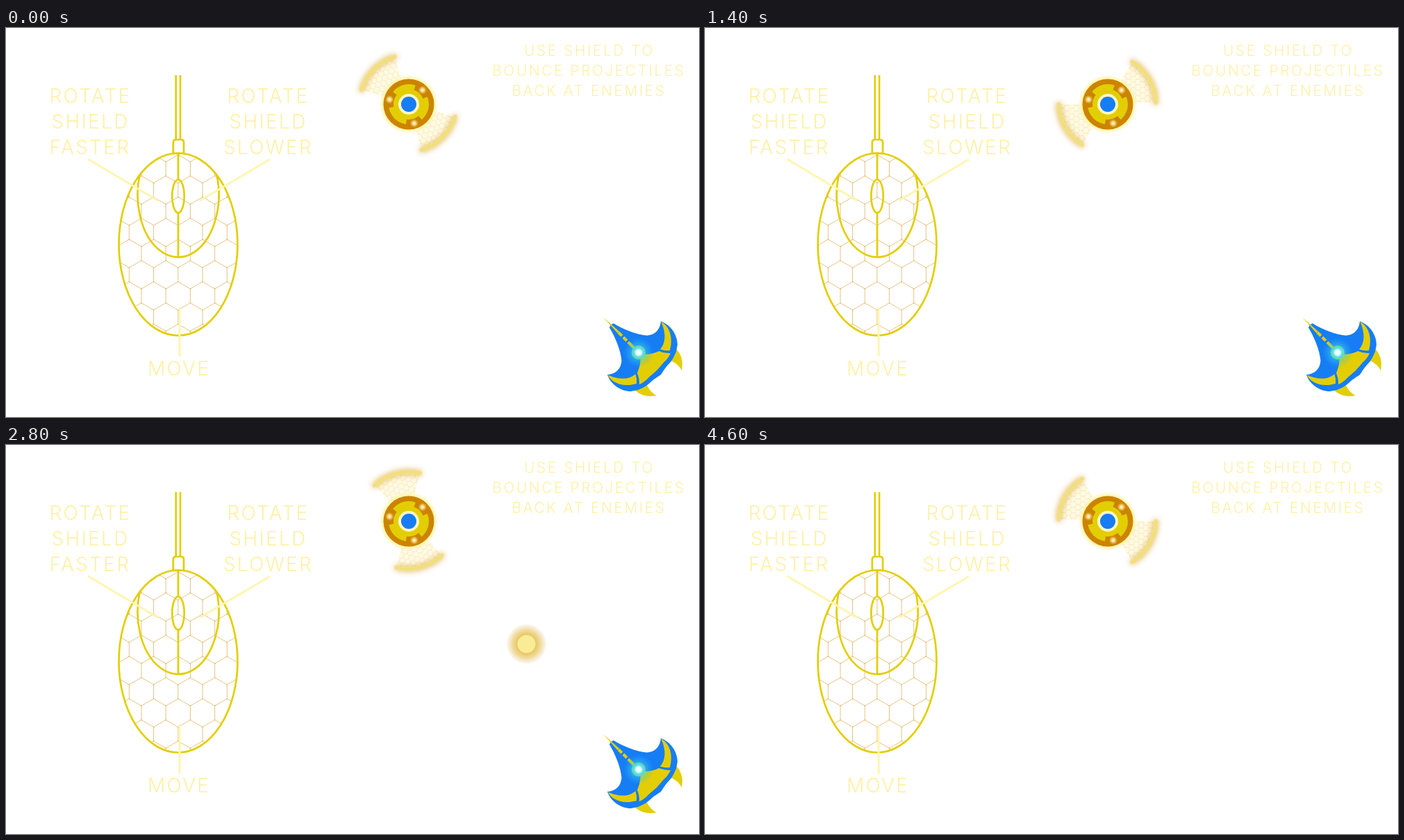
An HTML page with a canvas that plays this animation: 998 by 561 pixels, repeating every 4.8 s.

```html
<!DOCTYPE html>
<html lang="en">
<head>
<meta charset="utf-8">
<title>Shield controls</title>
<style>
  html, body { margin: 0; width: 100%; height: 100%; overflow: hidden; background: #fff; }
  canvas, svg { position: absolute; left: 0; top: 0; width: 998px; height: 561px; }
  text { font: 300 28px Inter, "Open Sans", sans-serif; letter-spacing: 2.3px; fill: #fff0a4; text-anchor: middle; }
  .tip text { font-size: 21px; letter-spacing: 2.5px; }
</style>
</head>
<body>
<canvas id="stage" width="998" height="561"></canvas>
<svg viewBox="0 0 998 561">
  <text x="121.5" y="107.5">ROTATE</text>
  <text x="121.5" y="144.5">SHIELD</text>
  <text x="121" y="182">FASTER</text>
  <text x="377.5" y="107.5">ROTATE</text>
  <text x="377.5" y="144.5">SHIELD</text>
  <text x="377.5" y="182">SLOWER</text>
  <text x="249" y="500.5">MOVE</text>
  <g class="tip">
    <text x="840" y="39.5">USE SHIELD TO</text>
    <text x="839.5" y="68.5">BOUNCE PROJECTILES</text>
    <text x="839.5" y="97.5">BACK AT ENEMIES</text>
  </g>
</svg>
<script>
const ctx = document.getElementById("stage").getContext("2d");
const LOOP = 4800, STEP = 200, TAU = Math.PI * 2;
const GOLD = "#e3ce05", AMBER = "#cc8400", BLUE = "#167df4", PALE = "#fff5b0";
const CX = 580, CY = 110;
const PIVOT = [579.2, 108.7], REACH = 70;
const rad = deg => deg * Math.PI / 180;

function disc(x, y, r, fill) {
  ctx.fillStyle = fill;
  ctx.beginPath();
  ctx.arc(x, y, r, 0, TAU);
  ctx.fill();
}

function glow(x, y, r, stops) {
  const g = ctx.createRadialGradient(x, y, 0, x, y, r);
  stops.forEach(([at, color]) => g.addColorStop(at, color));
  disc(x, y, r, g);
}

function line(x1, y1, x2, y2) {
  ctx.beginPath();
  ctx.moveTo(x1, y1);
  ctx.lineTo(x2, y2);
  ctx.stroke();
}

function oval(x, y, rx, ry) {
  ctx.beginPath();
  ctx.ellipse(x, y, rx, ry, 0, 0, TAU);
}

// Pointy-top honeycomb; (x0, y0) is the top of one upright edge.
function honeycomb(x0, y0, side, box, dot) {
  const half = side * Math.sqrt(3) / 2, row = side * 1.5;
  const [left, top, right, bottom] = box;
  const first = Math.floor((top - y0) / row) - 1;
  const last = Math.ceil((bottom - y0) / row);
  const dots = new Path2D();
  ctx.beginPath();
  for (let k = first; k <= last; k++) {
    const y = y0 + k * row;
    const from = Math.floor((left - x0) / (2 * half)) - 1;
    for (let x = x0 + from * 2 * half + (k & 1) * half; x < right + 2 * half; x += 2 * half) {
      ctx.moveTo(x, y);
      ctx.lineTo(x, y + side);
      ctx.lineTo(x - half, y + row);
      ctx.moveTo(x, y + side);
      ctx.lineTo(x + half, y + row);
      if (dot) {
        dots.rect(x - dot, y - dot, 2 * dot, 2 * dot);
        dots.rect(x - dot, y + side - dot, 2 * dot, 2 * dot);
      }
    }
  }
  ctx.stroke();
  if (dot) ctx.fill(dots);
}

function drawMouse() {
  ctx.save();
  oval(248, 312, 85.5, 131.5);
  ctx.clip();
  ctx.strokeStyle = ctx.fillStyle = "#e5bd75";
  ctx.lineWidth = 0.9;
  honeycomb(230.2, 193, 20.35, [160, 180, 336, 445], 0.8);
  ctx.restore();

  ctx.strokeStyle = GOLD;
  ctx.lineWidth = 2.7;
  oval(248, 312, 85.5, 131.5);
  ctx.stroke();
  const rise = Math.asin(29 / 90);
  ctx.beginPath();
  ctx.ellipse(248, 240.5, 58.5, 90, 0, -rise, Math.PI + rise);
  ctx.stroke();
  oval(248, 242.5, 8.7, 24);
  ctx.stroke();
  line(248, 181, 248, 218.5);
  line(248, 266.5, 248, 330);
  line(244.7, 68, 244.7, 161);
  line(251, 68, 251, 161);
  ctx.beginPath();
  ctx.moveTo(240.8, 181);
  ctx.lineTo(240.8, 165);
  ctx.quadraticCurveTo(240.8, 161, 244.8, 161);
  ctx.lineTo(252, 161);
  ctx.quadraticCurveTo(256, 161, 256, 165);
  ctx.lineTo(256, 181);
  ctx.closePath();
  ctx.stroke();

  ctx.strokeStyle = PALE;
  ctx.lineWidth = 3;
  line(118, 189, 219, 249);
  line(380, 189.5, 279, 249);
  line(250, 403, 250, 474);
}

function drawWing() {
  const spread = rad(29);
  ctx.save();
  ctx.beginPath();
  ctx.moveTo(0, 0);
  ctx.arc(0, 0, REACH, -spread, spread);
  ctx.closePath();
  ctx.clip();
  ctx.fillStyle = "#fffae3";
  ctx.fillRect(0, -40, 80, 80);
  ctx.strokeStyle = "rgba(222,190,100,.34)";
  ctx.lineWidth = 0.7;
  honeycomb(30, 0, 4.6, [25, -38, 72, 38]);
  ctx.restore();

  ctx.save();
  ctx.lineCap = "round";
  ctx.beginPath();
  ctx.arc(0, 0, REACH, -spread, spread);
  ctx.shadowColor = "rgba(214,160,50,.9)";
  ctx.shadowBlur = 9;
  ctx.lineWidth = 6;
  ctx.strokeStyle = "#f3e08c";
  ctx.stroke();
  ctx.shadowBlur = 0;
  ctx.lineWidth = 2.5;
  ctx.strokeStyle = "#f1df72";
  ctx.stroke();
  ctx.restore();
}

function drawShield(angle) {
  for (const turn of [0, Math.PI]) {
    ctx.save();
    ctx.translate(...PIVOT);
    ctx.rotate(angle + turn);
    drawWing();
    ctx.restore();
  }
  glow(CX, CY, 43, [[0, "#fff3a0"], [0.84, "#fff2a0"], [1, "rgba(255,246,180,0)"]]);
  disc(CX, CY, 36.5, AMBER);
  disc(CX, CY, 29, GOLD);
  for (const deg of [-46, 74, 194]) {
    const a = rad(deg);
    ctx.strokeStyle = AMBER;
    ctx.lineWidth = 8;
    ctx.beginPath();
    ctx.arc(CX, CY, 26, a - 0.42, a + 0.42);
    ctx.stroke();
    glow(CX + 28.5 * Math.cos(a), CY + 28.5 * Math.sin(a), 6.5,
      [[0, "#fffbe0"], [0.4, "rgba(255,236,170,.8)"], [1, "rgba(240,190,80,0)"]]);
  }
  disc(CX, CY, 15, "#fff8c4");
  disc(CX, CY, 11, BLUE);
}

// Ship halves mirror across the line x - y = 443.
const flip = new DOMMatrix([0, 1, 1, 0, 443, -443]);
function mirrored(d) {
  const half = new Path2D(d), whole = new Path2D(half);
  whole.addPath(half, flip);
  return whole;
}
const ship = {
  hull: mirrored("M871 428L875 426C889 434.5 908 442.5 923 443.5C936 442.5 942 434 943 423C957 428 967 442 967 457L965 467C962 474 959 480 955 484C949 490 946 496 943 500Z"),
  crescent: mirrored("M943.5 424C953 428 960 442 957.5 458L956 465Q949 466 942 463.5C950 455 951 440 943.5 424Z"),
  belly: mirrored("M913 470C924 472 934 469 940.5 466Q948 469.5 957 469C954 477 948 481 944 486L937 494Z"),
  fin: mirrored("M963.5 461C970 467 974 476 974 484Q974 489 973 494Q969 485 958 480Z")
};

function drawShip() {
  ctx.fillStyle = GOLD;
  ctx.fill(ship.fin);
  ctx.fillStyle = BLUE;
  ctx.fill(ship.hull);
  ctx.fillStyle = GOLD;
  ctx.fill(ship.crescent);
  ctx.fill(ship.belly);
  ctx.beginPath();
  ctx.moveTo(860, 417);
  ctx.lineTo(883, 437.5);
  ctx.lineTo(880.5, 440);
  ctx.fill();
  ctx.strokeStyle = GOLD;
  ctx.lineWidth = 4;
  for (const [a, b] of [[882, 887], [889, 894], [896, 904]]) line(a, a - 443, b, b - 443);
  glow(911, 468, 22, [[0, "rgba(70,225,235,.8)"], [0.45, "rgba(60,215,235,.5)"], [1, "rgba(40,180,245,0)"]]);
  disc(911, 468, 10, "#72dca0");
  glow(911, 468, 8.5, [[0, "#fff"], [0.4, "#e6ffff"], [0.75, "#66e2e6"], [1, "#46d2d8"]]);
}

function drawShot(x, y, back) {
  const rgb = back ? "226,186,66" : "92,190,250";
  const rim = back ? "232,200,130" : "150,180,250";
  glow(x, y, 29.5, [[0, `rgba(${rgb},.85)`], [0.45, `rgba(${rgb},.82)`],
    [0.7, `rgba(${rgb},.5)`], [0.88, `rgba(${rim},.29)`], [1, `rgba(${rim},0)`]]);
  disc(x, y, 13, back ? "#faec96" : "#d3f6fd");
}

// Flight runs at a steady pace, held to the ship's nose at either end.
function shotAt(t) {
  if (t < 1600 || t >= 3400) return null;
  const back = t >= 2600;
  if (!back) {
    const s = Math.max((t - 1800) / STEP, -0.84);
    return [808 - 59.4 * s, 356.5 - 68.2 * s, back];
  }
  const s = Math.min((t - 2800) / STEP, 1.7);
  return [749.5 + 58 * s, 287 + 69 * s, back];
}

function draw(now) {
  const t = Math.floor((now % LOOP) / STEP) * STEP;
  ctx.clearRect(0, 0, 998, 561);
  drawMouse();
  drawShield(rad(45 + 360 * t / LOOP));
  if (t < 3400) drawShip();
  const shot = shotAt(t);
  if (shot) drawShot(...shot);
}

const start = performance.now();
function tick() {
  draw(performance.now() - start);
  requestAnimationFrame(tick);
}
tick();
</script>
</body>
</html>
```
